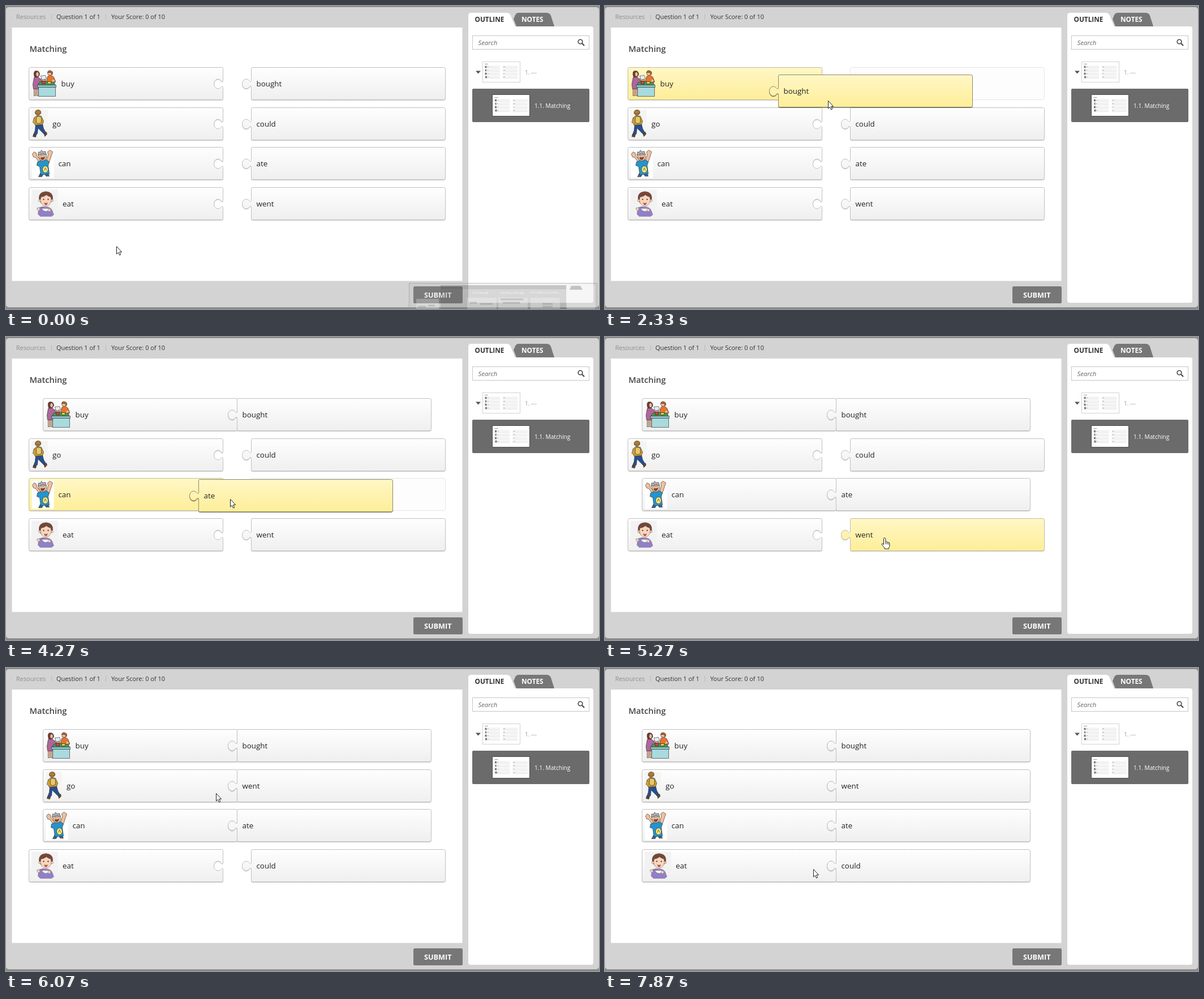
Write an HTML page that moves like this. It is 1048x535 px and loops after 8000 ms.

```html
<!DOCTYPE html>
<html lang="en">
<head>
<meta charset="utf-8">
<title>Matching</title>
<style>
html, body { margin: 0; width: 100%; height: 100%; overflow: hidden; background: #8a8a8a; }
svg { display: block; }
text { font-family: "Open Sans", sans-serif; fill: #333; white-space: pre; }
.bar text { font-size: 10.95px; }
.tab { font-size: 11.8px; font-weight: 700; }
.nav { font-size: 10.15px; }
.item text { font-size: 13.4px; fill: #222; }
.shape { fill: url(#plain); stroke: #c0c0c0; filter: drop-shadow(0 1px .3px rgba(0,0,0,.18)); }
.hot .shape { fill: url(#yellow); stroke: #c2bda0; }
.held .shape { stroke: #8d8969; filter: drop-shadow(0 1px .7px rgba(0,0,0,.45)); }
#slot { fill: #fdfdfd; stroke: #e6e6e6; }
.ink { stroke: #222; stroke-width: .6; stroke-linejoin: round; }
.pointer { fill: #fff; stroke: #222; stroke-linejoin: round; }
</style>
</head>
<body>
<svg width="1048" height="535" viewBox="0 0 1048 535">
  <defs>
    <linearGradient id="plain" x2="0" y2="1"><stop stop-color="#fefefe"/><stop offset="1" stop-color="#efefef"/></linearGradient>
    <linearGradient id="yellow" x2="0" y2="1"><stop stop-color="#fff7c6"/><stop offset="1" stop-color="#feee98"/></linearGradient>
    <g id="thumb">
      <rect width="66" height="37" fill="#fff"/>
      <path d="M4 4.500h6" stroke="#999"/>
      <path d="M4 9.500h27M4 15.500h27M4 21.500h27M4 27.500h27M36 9.500h26M36 15.500h26M36 21.500h26M36 27.500h26" stroke="#f3f3f3" stroke-width="4.500"/>
      <path d="M4 11.700h27M4 17.700h27M4 23.700h27M4 29.700h27M36 11.700h26M36 17.700h26M36 23.700h26M36 29.700h26" stroke="#ddd" stroke-width=".6"/>
      <path d="M4.500 9.500h3M5 15.500h2M4.500 21.500h3M5 27.500h3" stroke="#777" stroke-width="3.500"/>
      <path d="M9 9.500h2M8.500 15.500h2M9 21.500h2M9 27.500h2M37 9.500h3M37 15.500h3M37 21.500h2M37 27.500h3" stroke="#aaa"/>
    </g>

    <g id="buy" class="ink">
      <path d="M7 30l2-12 6-2 5 4 5 4-1 3-6-1-1 5 1 7H8z" fill="#b0649b"/>
      <path d="M9 38h3v12H9zM14 38h3v12h-3z" fill="#f0b694"/>
      <path d="M9 13q-1-7 4-7 6 0 6 7l-3 4h-6z" fill="#74382e"/>
      <ellipse cx="15" cy="12" rx="2.700" ry="4" fill="#f4bd99"/>
      <path d="M31 25l2-9 5-3 6 4 3 8-3 5H32z" fill="#e8742d"/>
      <circle cx="37" cy="10" r="4" fill="#f4bd99"/>
      <path d="M33 9q1-5 6-3 5 2 2 7l-2-4z" fill="#b8622a"/>
      <path d="M20 20l10 2-1 3-8-2zM43 20l4 4-8 4" fill="#f4bd99"/>
      <path d="M21 15l8-1 2 6-8 2z" fill="#e6edf3"/>
      <path d="M18 28l5-4 20 2 4 5H16z" fill="#3d9e55"/>
      <path d="M23 24h6v5h-6z" fill="#d2403a"/>
      <path d="M33 25h6v4h-6z" fill="#ebcf45"/>
      <path d="M15 31h33v4H15z" fill="#8fc6cb"/>
      <path d="M17 35h30v16H17z" fill="#a9dade"/>
    </g>
    <g id="go">
      <rect x="5" y="4" width="28" height="49" fill="#f4f4f2"/>
      <g class="ink">
        <path d="M12 30l12-1 2 8 4 7-3 3-7-7-4-4-1 10-4 4-3-2 3-8z" fill="#264f91"/>
        <path d="M8 47l5 2-1 3-5-1zM27 46l4-3 1 4-4 4z" fill="#70452b"/>
        <path d="M9 18l5-4 8 1 4 9-2 6-13 1-2-6z" fill="#c99b35"/>
        <path d="M13 17q5-4 9 1v8q-5 4-9 0z" fill="#e6c76a"/>
        <path d="M9 18l-2 8 4 3" fill="#d5a83d"/>
        <circle cx="16" cy="9" r="4.600" fill="#d99a6b"/>
        <path d="M11 10q0-6 5-6 6 0 5 6l-5 2z" fill="#b07a2e"/>
      </g>
    </g>
    <g id="can">
      <rect x="5" y="4" width="39" height="50" fill="#fff"/>
      <g class="ink">
        <path d="M19 28l-7-10-4-1-2-5 3-4 4 2 1 5 8 9zM31 23l3-10-1-5 4-3 5 3-2 6-4 12z" fill="#f0c09c"/>
        <path d="M20 46h6l-3 6h-6zM28 46h6l2 5h-6z" fill="#47628c"/>
        <path d="M15 26l6-3 10-1 5 4-2 6 2 15-15 2-2-15-5-2z" fill="#2494cc"/>
        <path d="M17 14q0-6 7-6 7 1 7 9-1 7-7 7t-7-10z" fill="#f0c09c"/>
        <path d="M16 14l1-6 3 1 2-4 3 3 4-1 2 6-7-2-5 2z" fill="#b0b2b4"/>
        <path d="M21 18q4 1 7-1-1 5-4 5t-3-4z" fill="#a53e38"/>
        <circle cx="22" cy="14" r="1.200" fill="#fff"/><circle cx="26" cy="13" r="1.200" fill="#fff"/>
        <ellipse cx="29" cy="39" rx="5" ry="6" fill="#f5e87b"/>
        <path d="M27 41l2-5 2 5" fill="none"/>
      </g>
    </g>
    <g id="eat">
      <rect x="5" y="4" width="46" height="49" fill="#f2f2f2"/>
      <g stroke="#806a70" stroke-width=".5">
        <path d="M17 39q4-5 12-5 9 0 12 6l3 8-4 3H20l-4-4z" fill="#8f80c8"/>
        <path d="M18 22q-2-14 12-15 14 1 12 15l-5 6H22z" fill="#6b3e30"/>
        <circle cx="19" cy="23" r="2" fill="#f6cdb1"/><circle cx="41" cy="23" r="2" fill="#f6cdb1"/>
        <ellipse cx="30" cy="22" rx="9.500" ry="11" fill="#f9d5bb"/>
        <path d="M20 17q2-8 10-8t10 8q-6-1-9-4-5 4-11 4z" fill="#74452f"/>
        <circle cx="26" cy="21" r="1" fill="#222"/><circle cx="34" cy="21" r="1" fill="#222"/>
        <path d="M27 27q3 1 6 0-1 4-3 4t-3-4z" fill="#c4524d"/>
        <path d="M23 37h13q-1 5-6 5t-7-5z" fill="#f5f5f5"/>
        <path d="M14 37l12-3" stroke="#777" stroke-width="1.300"/>
        <circle cx="17" cy="38" r="2.500" fill="#f9d5bb"/><circle cx="36" cy="40" r="2.500" fill="#f9d5bb"/>
      </g>
    </g>
  </defs>

  <rect y="2" width="1048" height="530" rx="5" fill="#d3d3d3"/>
  <g class="bar">
    <text x="18" y="23" style="fill:#8e8e8e">Resources</text>
    <text x="89" y="23">Question 1 of 1</text>
    <text x="186" y="23">Your Score: 0 of 10</text>
    <path d="M80.500 14v10M176.500 14v10" stroke="#b9b9b9"/>
  </g>
  <rect x="10.500" y="38" width="796" height="447.500" fill="#fff"/>
  <text x="41.500" y="80.500" font-size="14.700" font-weight="600" style="fill:#444">Matching</text>

  <path d="M906 12h49q6 0 8 5l6 19h-67l-5-13 3-7q2-4 6-4z" fill="#777"/>
  <path d="M817 42V17q0-5 5-5h62q6 0 8 5l8 20z" fill="#fff"/>
  <path d="M817 36h217q4 0 4 4v480q0 4-4 4H821q-4 0-4-4z" fill="#fff"/>
  <text class="tab" x="828.500" y="28">OUTLINE</text>
  <text class="tab" x="911" y="28" style="fill:#fff">NOTES</text>
  <rect x="824.500" y="52.500" width="206" height="24" fill="#fff" stroke="#c6c6c6"/>
  <text x="834.500" y="69" font-size="11.400" font-style="italic" style="fill:#666">Search</text>
  <circle cx="1015" cy="63" r="3.800" fill="none" stroke="#444" stroke-width="1.600"/>
  <path d="M1018 66l4 4" stroke="#444" stroke-width="2.200"/>
  <path d="M830 114.500h9l-4.500 5z" fill="#555"/>
  <use href="#thumb" x="842" y="98"/>
  <rect x="842.500" y="98.500" width="66" height="36" fill="none" stroke="#d2d2d2"/>
  <text class="nav" x="917" y="121" style="fill:#999">1. ---</text>
  <rect x="824" y="146" width="207" height="59" rx="2" fill="#6b6b6b"/>
  <use href="#thumb" x="859.500" y="157"/>
  <rect x="859.500" y="156.500" width="66" height="38" fill="none" stroke="#4c4c4c"/>
  <text class="nav" x="934" y="179.500" style="fill:#fff">1.1. Matching</text>
  <rect x="720" y="495" width="87" height="30" rx="2.500" fill="#777"/>
  <text x="739" y="514.500" font-size="12.700" font-weight="700" style="fill:#fff">SUBMIT</text>

  <g id="left"></g>
  <path id="slot"/>
  <g id="right"></g>

  <g id="preview">
    <rect x="712.500" y="489.500" width="332" height="50" fill="#999" fill-opacity=".12" stroke="#999" stroke-opacity=".6"/>
    <rect x="768" y="493" width="222" height="42" fill="#444" fill-opacity=".16"/>
    <rect x="768" y="493" width="222" height="7" fill="#4c454c" fill-opacity=".12"/>
    <path d="M991 493h50v42h-50z" fill="#fff" fill-opacity=".25"/>
    <path d="M996 501l3-7h16l4 7z" fill="#777" fill-opacity=".4"/>
    <path d="M725 517h40v18h-40zM815 515h52v20h-52zM870 515h52v20h-52zM927 515h52v20h-52z" fill="#fff" fill-opacity=".25"/>
    <path d="M728 531h14M746 529h12M820 524h12M838 526h22M874 518h40M878 524h30M948 526h18M948 531h18" stroke="#555" stroke-opacity=".22" stroke-width="3"/>
    <g font-size="5" fill-opacity=".8"><text x="825" y="508" style="fill:#fff">Families.jpg</text><text x="873" y="508" style="fill:#fff">morning_chalk.jpg</text><text x="927" y="508" style="fill:#fff">PICTURES_Small.PNG</text></g>
  </g>

  <path id="arrow" class="pointer" d="M.5.5v13.500l3-2.800 2.100 4.800 2.200-1-2.100-4.700h3.900z"/>
  <g id="hand">
    <path class="pointer" d="M-1.500 1.500q0-1.800 1.700-1.800t1.700 1.800v5q1.600-1 2.600.6 1.800-.6 2.400.8 2-.3 2 1.800v4q0 2-1.500 3.500v1.800H0v-1.800l-4.600-5.400q-.9-1.600.5-2 1.200-.2 2.600 1.800z"/>
    <path d="M1.900 7v4M4.500 7.500v3.500M6.900 8.500v3" stroke="#222" stroke-width=".9"/>
  </g>
</svg>
<script>
const $ = id => document.getElementById(id);
const LOOP = 8000, STEP = 1000 / 15;
const ROWS = [108.5, 179.5, 249.5, 320.5];
const LEFT_X = 40.5, RIGHT_X = 433.5, LEFT_JOINED = 65.5, RIGHT_JOINED = 408.5;
const WIDTH = 343, HEIGHT = 57;

// Puzzle joint, drawn downwards along a vertical edge.
const joint = 'c0 3-2.500 2-4 0c-4-5-12-2-12 6c0 8 8 11 12 6c1.500-2 4-3 4 0';
const leftShape = `M3 0H341q2 0 2 2V23${joint}V55q0 2-2 2H3q-3 0-3-3V3q0-3 3-3z`;
const rightShape = `M0 2V23${joint}V55q0 2 2 2H340q3 0 3-3V3q0-3-3-3H2q-2 0-2 2z`;

const verbs = [['buy', 57], ['go', 41.5], ['can', 52], ['eat', 59.5]];
const forms = ['bought', 'could', 'ate', 'went'];

function addItem(parent, shape, word, textX, art = '') {
  const g = document.createElementNS('http://www.w3.org/2000/svg', 'g');
  g.innerHTML = `<path class="shape" d="${shape}"/>${art}<text x="${textX}" y="33">${word}</text>`;
  return parent.appendChild(g);
}
const lefts = verbs.map(([word, x]) => addItem($('left'), leftShape, word, x, `<use href="#${word}"/>`));
const rights = forms.map(word => addItem($('right'), rightShape, word, 9));
$('slot').setAttribute('d', rightShape);

// Pointer path: time, x, y
const path = [
  [0, 195, 424], [533, 195, 424], [733, 149, 496], [800, 149, 496],
  [1267, 504, 218], [1667, 521, 154], [2133, 400, 172], [2267, 400, 172],
  [2333, 394, 167], [2467, 394, 167], [2800, 396, 240], [3133, 377, 223],
  [3400, 379, 246], [3733, 489, 284], [4000, 407, 286], [4267, 396, 286],
  [4600, 396, 286], [5133, 482, 361], [5267, 494, 355], [5400, 494, 355],
  [5933, 371, 221], [6067, 371, 221], [6267, 482, 206], [6333, 480, 203],
  [6400, 480, 203], [6800, 489, 343], [6867, 489, 343], [7267, 397, 355],
  [7400, 368, 355], [8000, 368, 355]
];
const drags = [
  { form: 0, row: 0, grab: 1667, drop: 2467 },
  { form: 2, row: 2, grab: 3733, drop: 4667 },
  { form: 3, row: 1, grab: 5400, drop: 6000 },
  { form: 1, row: 3, grab: 6867, drop: 7867 }
];

function pointerAt(t) {
  const i = Math.max(1, path.findIndex(p => p[0] >= t));
  const [t0, x0, y0] = path[i - 1], [t1, x1, y1] = path[i];
  const k = (t - t0) / (t1 - t0);
  return [Math.round(x0 + (x1 - x0) * k), Math.round(y0 + (y1 - y0) * k)];
}

const place = (el, x, y) => el.setAttribute('transform', `translate(${x} ${y})`);

function render(time) {
  const t = Math.floor((time + 5) / STEP) * STEP % LOOP;
  const near = 2;
  const [px, py] = pointerAt(t);
  const rowOf = [0, 1, 2, 3], joined = [false, false, false, false];
  let held = null;

  for (const d of drags) {
    if (t >= d.drop - near) {
      const other = rowOf.indexOf(d.row);
      rowOf[other] = rowOf[d.form];
      rowOf[d.form] = d.row;
      joined[d.row] = true;
    } else if (t > d.grab + near) held = d;
  }

  let heldX, heldY, target = -1;
  if (held) {
    const [gx, gy] = pointerAt(held.grab);
    const homeY = ROWS[rowOf[held.form]];
    heldX = RIGHT_X + px - gx;
    heldY = homeY + py - gy;
    if (heldX < LEFT_X + WIDTH)
      target = ROWS.findIndex((y, i) => !joined[i] && Math.abs(y - heldY) < 35);
    place($('slot'), RIGHT_X, homeY);
  }
  $('slot').style.display = held ? '' : 'none';

  lefts.forEach((el, row) => {
    place(el, joined[row] ? LEFT_JOINED : LEFT_X, ROWS[row]);
    el.setAttribute('class', row === target ? 'item hot' : 'item');
  });

  let hovering = false;
  rights.forEach((el, form) => {
    const row = rowOf[form], isHeld = held && held.form === form;
    const x = isHeld ? heldX : joined[row] ? RIGHT_JOINED : RIGHT_X;
    const y = isHeld ? heldY : ROWS[row];
    const hover = !held && px > x && px < x + WIDTH && py > y && py < y + HEIGHT;
    hovering = hovering || hover;
    place(el, x, y);
    el.setAttribute('class', isHeld ? 'item hot held' : hover ? 'item hot' : 'item');
  });
  if (held && $('right').lastChild !== rights[held.form]) $('right').append(rights[held.form]);

  for (const id of ['arrow', 'hand']) {
    place($(id), px, py);
    $(id).style.display = (id === 'hand') === hovering ? '' : 'none';
  }
  $('preview').style.opacity = Math.max(0, 1 - t / 200);
}

const start = performance.now();
function tick() {
  render((performance.now() - start) % LOOP);
  requestAnimationFrame(tick);
}
tick();
</script>
</body>
</html>
```
